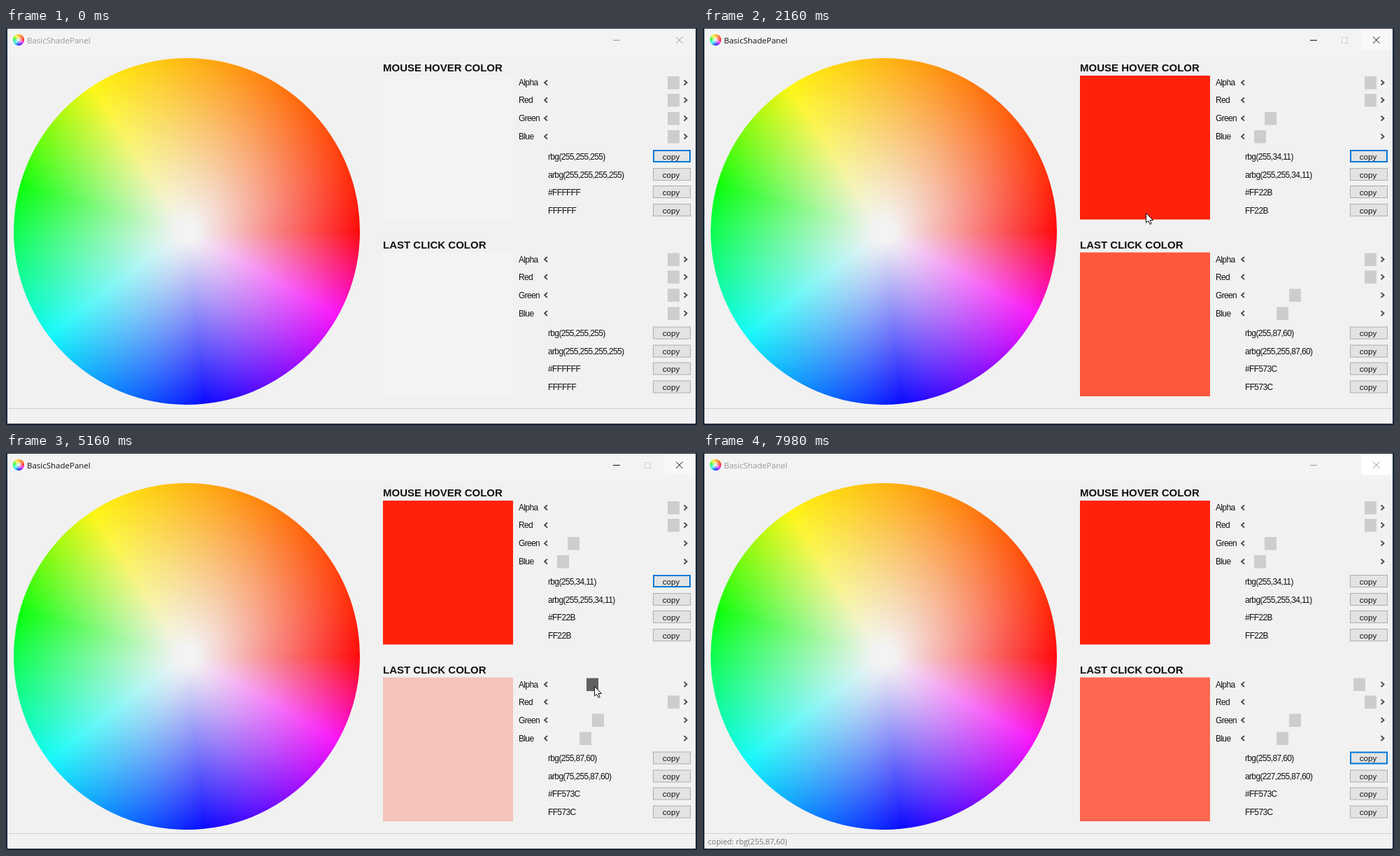
An HTML page that plays this animation: 988x567 px, repeating every 8000 ms.

```html
<!DOCTYPE html>
<html lang="en">
<head>
<meta charset="utf-8">
<title>BasicShadePanel</title>
<style>
  html, body { margin: 0; width: 100%; height: 100%; overflow: hidden; background: #f1f1f1; }
  .bar { position: absolute; width: 100%; height: 40px; background: #f3f3f3; }
  .wheel {
    position: absolute; border-radius: 50%;
    background:
      radial-gradient(closest-side, #f3f3f3 6%, rgba(243, 243, 243, .04)),
      conic-gradient(from -33deg, #fff60a, #f00 123deg, #fa0afa 152deg, #00f 207deg, #0afafa 266deg, #0f0 318deg, #fff60a);
  }
  #big { left: 11.3px; top: 42.5px; width: 495px; height: 495px; }
  #icon { left: 10px; top: 9px; width: 16px; height: 16px; }
  svg { position: absolute; left: 0; top: 0; }
  text { font: 11.5px "Liberation Sans", Arial, sans-serif; fill: #111; white-space: pre; }
  .label { font-size: 12px; letter-spacing: -.65px; }
  .heading { font-size: 15px; font-weight: bold; }
  .caption { font: 11.5px "Open Sans", sans-serif; }
  .status { font: 11px "Open Sans", sans-serif; fill: #777; }
  .chevron { fill: none; stroke: #484848; stroke-width: 1.8; }
</style>
</head>
<body>
<div class="bar"></div>
<div id="big" class="wheel"></div>
<div id="icon" class="wheel"></div>
<svg width="988" height="567" viewBox="0 0 988 567">
  <path d="M2 543.5H986" stroke="#d2d2d2"/>
  <rect id="closeBox" x="941" y="3" width="45" height="28"/>
  <text id="caption" class="caption" x="30" y="22">BasicShadePanel</text>
  <g fill="none">
    <path id="minimize" d="M868 17.5H878"/>
    <rect id="maximize" x="913.5" y="13.5" width="8" height="8" stroke="#d0d0d0"/>
    <path id="close" d="M958 12.5L967.5 22M967.5 12.5L958 22"/>
  </g>
  <g id="panels"></g>
  <text id="status" class="status" x="7" y="559">copied: rbg(255,87,60)</text>
  <rect x="1" width="986" height="566" fill="none" stroke="#1b293b" stroke-width="2"/>
  <path id="cursor" d="M.5.5V14.2L3.7 11.3 6 16.4 8.2 15.4 6 10.5H10.5Z" fill="#fff" stroke="#111"/>
</svg>
<script>
const LOOP = 8000, STEP = 60;
const CLICK = 1740, LEAVE_WHEEL = 2072, COPY = 6540, LEAVE_WINDOW = 7740, BLUR = 7980;
const byId = id => document.getElementById(id);

const linear = f => f;
const easeIn = f => f * f;
const easeOut = f => 1 - (1 - f) ** 2;
const glide = f => 1 - (1 - f) ** 3;

// Pointer moves; those with alpha drag the lower alpha slider.
const moves = [
  { from: 360, to: 840, x: 474, y: 214, ease: glide },
  { from: 960, to: 1200, x: 454, y: 222, ease: easeOut },
  { from: 1440, to: 1680, x: 443.5, y: 242, ease: easeOut },
  { from: 2040, to: 2160, x: 633, y: 264, ease: linear },
  { from: 2160, to: 2820, x: 949, y: 329, ease: glide },
  { from: 3060, to: 3780, x: 826, y: 331, alpha: 58, ease: easeOut },
  { from: 4200, to: 4500, x: 811, y: 333, alpha: 25, ease: easeOut },
  { from: 4740, to: 5460, x: 898, y: 332, alpha: 172, ease: easeIn },
  { from: 5580, to: 5820, x: 940, y: 321, alpha: 227, ease: easeOut },
  { from: 6120, to: 6480, x: 948, y: 437, ease: glide },
  { from: 6600, to: 7140, x: 587, y: 538, ease: easeIn },
  { from: 7440, to: 7680, x: 962, y: 14, ease: linear }
];

function pointerAt(t) {
  const at = { x: 955, y: 14, alpha: 255 };
  for (const move of moves) {
    const f = move.ease(Math.min(1, Math.max(0, (t - move.from) / (move.to - move.from))));
    for (const key in at) at[key] += ((move[key] ?? at[key]) - at[key]) * f;
  }
  return at;
}

// Color in the red to yellow sector, or null outside the wheel.
function wheelColor({ x, y }) {
  const dx = x - 258.8, dy = 290 - y;
  const pale = 255 * (1 - Math.hypot(dx, dy) / 249.5);
  if (pale < 0) return null;
  const hue = Math.atan2(dy, dx) * 180 / Math.PI / 104.5;
  return [255, pale + (255 - pale) * hue, pale].map(Math.round);
}

function add(parent, tag, attrs, text = '') {
  const node = document.createElementNS('http://www.w3.org/2000/svg', tag);
  set(node, attrs);
  node.textContent = text;
  return parent.appendChild(node);
}

function set(node, attrs) {
  for (const name in attrs) node.setAttribute(name, attrs[name]);
}

function show(id, visible) {
  set(byId(id), { visibility: visible ? 'visible' : 'hidden' });
}

function makePanel(top, title) {
  const g = add(byId('panels'), 'g', { transform: `translate(0 ${top})` });
  add(g, 'text', { x: 539, y: 62, class: 'heading' }, title);
  const swatch = add(g, 'rect', { x: 539, y: 68, width: 186, height: 205.5 });
  const thumbs = ['Alpha', 'Red', 'Green', 'Blue'].map((name, i) => {
    const y = Math.round(77.5 + i * 25.7);
    add(g, 'text', { x: 733, y: y + 4, class: 'label' }, name);
    add(g, 'rect', { x: 764, y: y - 9, width: 216, height: 18, fill: '#f2f2f2' });
    for (const [x, dir] of [[770, 1], [973.5, -1]])
      add(g, 'path', { class: 'chevron', d: `M${x + 4 * dir} ${y - 3.5}L${x} ${y}l${4 * dir} 3.5` });
    return add(g, 'rect', { y: y - 9, width: 17, height: 18.5, fill: '#cdcdcd' });
  });
  const values = [], buttons = [];
  for (let i = 0; i < 4; i++) {
    const y = 183 + Math.round(i * 25.5);
    values.push(add(g, 'text', { x: 775, y: y + 4.5, class: 'label' }));
    const button = add(g, 'g', { transform: `translate(925 ${y - 9})` });
    buttons.push(add(button, 'rect', {}));
    add(g, 'text', { x: 951, y: y + 4.5, 'text-anchor': 'middle' }, 'copy');
  }
  return { swatch, thumbs, values, buttons };
}

function showColor(panel, alpha, picked) {
  const rgb = picked || [255, 255, 255], argb = [alpha, ...rgb];
  const hex = rgb.map(v => v.toString(16).toUpperCase()).join('');
  const mixed = rgb.map(v => Math.round(240 + (v - 240) * alpha / 255));
  set(panel.swatch, { fill: picked ? `rgb(${mixed})` : '#f3f3f3' });
  panel.thumbs.forEach((thumb, i) => set(thumb, { x: Math.round(Math.min(946, 780.5 + argb[i] * .66)) }));
  [`rbg(${rgb})`, `arbg(${argb})`, '#' + hex, hex].forEach((text, i) => panel.values[i].textContent = text);
}

function styleButton(button, focused, hovered) {
  const line = focused ? 2 : 1;
  set(button, {
    x: line / 2, y: line / 2, width: 54 - line, height: 18 - line, 'stroke-width': line,
    fill: hovered ? '#e5f1fb' : '#e3e3e3',
    stroke: focused || hovered ? '#0078d7' : '#adadad'
  });
}

const hover = makePanel(0, 'MOUSE HOVER COLOR');
const clicked = makePanel(252.5, 'LAST CLICK COLOR');
[hover, clicked].forEach(panel => panel.buttons.forEach(button => styleButton(button)));
const clickColor = wheelColor(pointerAt(CLICK));

function draw(t) {
  const within = (from, to) => t >= from && t < to;
  const active = within(1500, BLUR), ink = active ? '#111' : '#999';
  const overClose = within(7680, LEAVE_WINDOW);
  const pointer = pointerAt(t);

  byId('caption').style.fill = ink;
  set(byId('minimize'), { stroke: ink });
  set(byId('close'), { stroke: overClose ? '#fff' : ink });
  set(byId('closeBox'), { fill: overClose ? '#e81123' : t >= LEAVE_WINDOW ? '#fff' : t >= 1440 ? '#f8f8f8' : 'none' });
  show('maximize', active);

  showColor(hover, 255, wheelColor(pointerAt(Math.min(t, LEAVE_WHEEL))));
  showColor(clicked, Math.round(pointer.alpha), t >= CLICK && clickColor);
  set(clicked.thumbs[0], { fill: within(3120, 6120) ? '#606060' : within(2700, 6240) ? '#a6a6a6' : '#cdcdcd' });

  styleButton(hover.buttons[0], t < COPY);
  styleButton(clicked.buttons[0], t >= COPY, within(6420, 6720));
  show('status', t >= COPY);

  set(byId('cursor'), { transform: `translate(${Math.round(pointer.x)} ${Math.round(pointer.y)})` });
  show('cursor', within(360, LEAVE_WINDOW));
}

const start = performance.now();
function tick() {
  const time = (performance.now() - start) % LOOP;
  draw(Math.floor(time / STEP) * STEP);
  requestAnimationFrame(tick);
}
tick();
</script>
</body>
</html>
```
